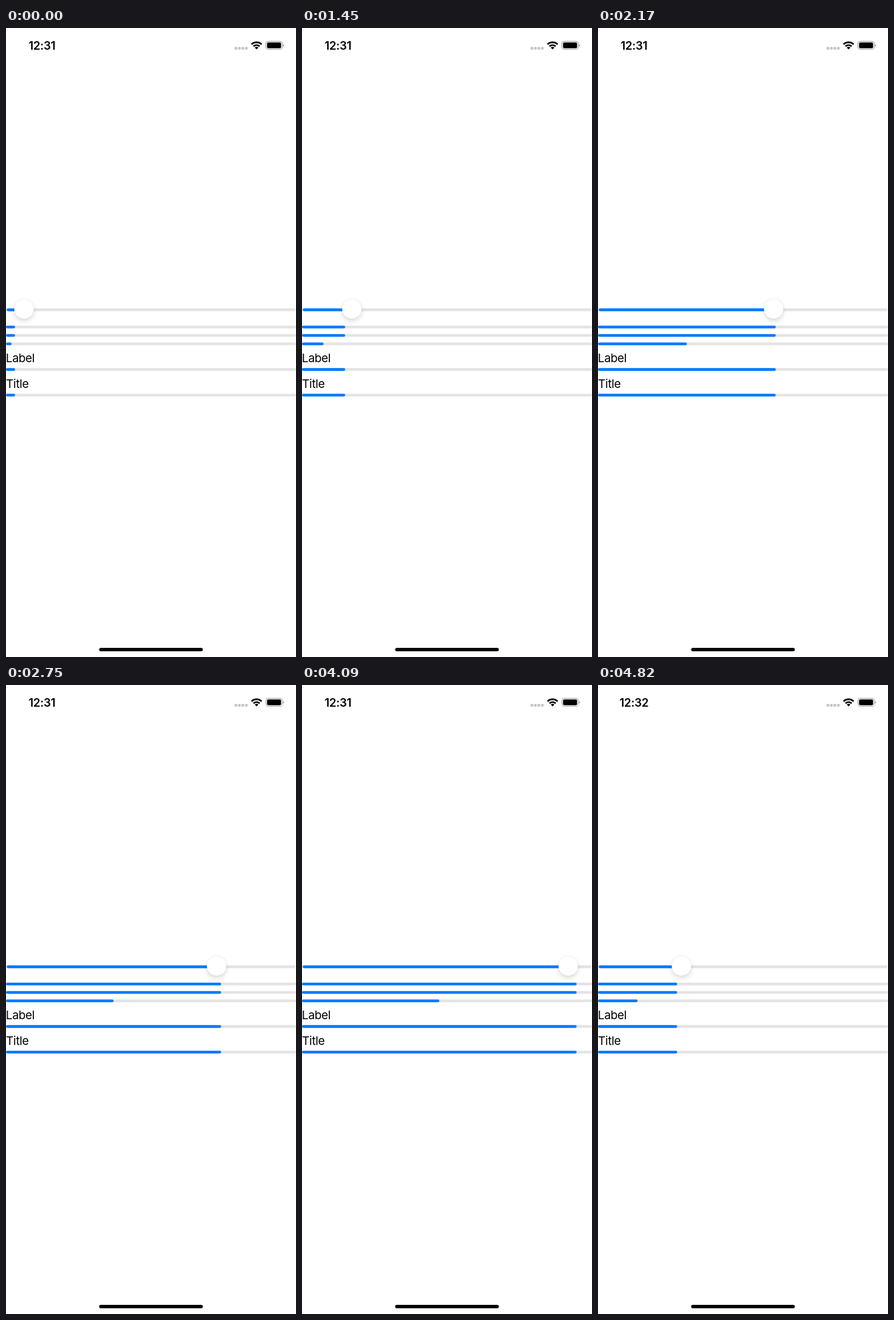
An HTML page for the animation above (4.94 s loop, 509 by 1101 pixels).

```html
<!DOCTYPE html>
<html lang="en">
<head>
<meta charset="utf-8">
<title>Slider and progress bars</title>
<style>
  html, body { margin: 0; width: 100%; height: 100%; overflow: hidden; background: #fff; }
  svg { display: block; width: 100vw; height: 100vh; }
  text { font-family: Inter, Roboto, sans-serif; font-size: 20.4px; letter-spacing: -0.4px; }
  #clock { font-size: 20px; font-weight: 600; letter-spacing: -0.3px; text-anchor: middle; }
  #thumb {
    fill: #fff;
    filter: drop-shadow(0 0 .8px rgba(0,0,0,.1)) drop-shadow(0 4px 4.5px rgba(0,0,0,.14));
  }
</style>
</head>
<body>
<svg id="stage" viewBox="0 0 509 1101">
  <rect width="509" height="1101" fill="#fff"/>
  <text id="clock" x="63.2" y="37.8">12:31</text>
  <g id="dots" fill="#c9c9c9"></g>

  <g transform="translate(439.8 37.5)" fill="none" stroke="#000">
    <path d="M-8.8 -8.8A12.4 12.4 0 0 1 8.8 -8.8" stroke-width="3"/>
    <path d="M-5.4 -5.4A7.7 7.7 0 0 1 5.4 -5.4" stroke-width="2.9"/>
    <path d="M0 0L-3.2 -3.2A4.5 4.5 0 0 1 3.2 -3.2Z" fill="#000" stroke="none"/>
  </g>

  <rect x="456.2" y="23.3" width="28.6" height="14.2" rx="4.2" fill="none" stroke="#a2a2a2" stroke-width="1.2"/>
  <rect x="458.2" y="25.2" width="24.6" height="10.4" rx="2.4"/>
  <path d="M486.2 28.2Q488.3 28.9 488.3 30.5T486.2 32.8Z" fill="#a2a2a2"/>

  <g id="bars"></g>
  <circle id="thumb" cy="491.8" r="17.1"/>

  <text x="-0.2" y="585.1">Label</text>
  <text x="0.1" y="630">Title</text>
  <rect x="163.5" y="1085" width="182" height="6.1" rx="3.05"/>
</svg>
<script>
const LOOP = 4940, MINUTE = 4580, WIDTH = 509, BAR = 4.92;
const $ = id => document.getElementById(id);

// Each drag moves the value in `steps` equal time steps, then holds it.
const drags = [
  { start: 0,    end: 100,  steps: 1,  to: .0335, power: 1 },
  { start: 970,  end: 2170, steps: 10, to: .613,  power: 1.76 },
  { start: 2650, end: 2950, steps: 3,  to: 1,     power: 1 },
  { start: 3967, end: 4820, steps: 7,  to: .273,  power: 1.346 }
];

function valueAt(t) {
  let value = .0314;
  for (const { start, end, steps, to, power } of drags) {
    const step = Math.floor((t - start) * steps / (end - start));
    const k = Math.min(Math.max(step / steps, 0), 1);
    value += (to - value) * k ** power;
  }
  return value;
}

function rect(parent, x, y, width, height, rx, fill = "inherit") {
  const r = document.createElementNS("http://www.w3.org/2000/svg", "rect");
  const attrs = { x, y, width, height, rx, fill };
  for (const k in attrs) r.setAttribute(k, attrs[k]);
  return $(parent).appendChild(r);
}

function progress(x, y, width) {
  const add = (w, color) => rect("bars", x, y - BAR / 2, w, BAR, BAR / 2, color);
  add(width, "#e4e4e6");
  return add(0, "#007aff");
}

for (let i = 0; i < 4; i++) rect("dots", 401 + 6.1 * i, 33, 5, 5, 1.7);

const slider = progress(1.2, 493.2, WIDTH - 2.4);
const rows = [523.4, 538.1, 552.9, 597.75, 642.6].map(y => progress(0, y, WIDTH));

function draw(t) {
  const value = valueAt(t);
  const cx = 16.6 + value * (WIDTH - 33.2);
  $("thumb").setAttribute("cx", cx);
  slider.setAttribute("width", cx - 1.2);
  rows.forEach((fill, i) => {
    const share = i === 2 ? value / 2 : value;  // the third bar counts to twice the total
    fill.setAttribute("width", Math.max(2 * BAR, share * WIDTH));
  });
  $("clock").textContent = t < MINUTE ? "12:31" : "12:32";
}

function tick() {
  draw(performance.now() % LOOP);
  requestAnimationFrame(tick);
}
tick();
</script>
</body>
</html>
```
